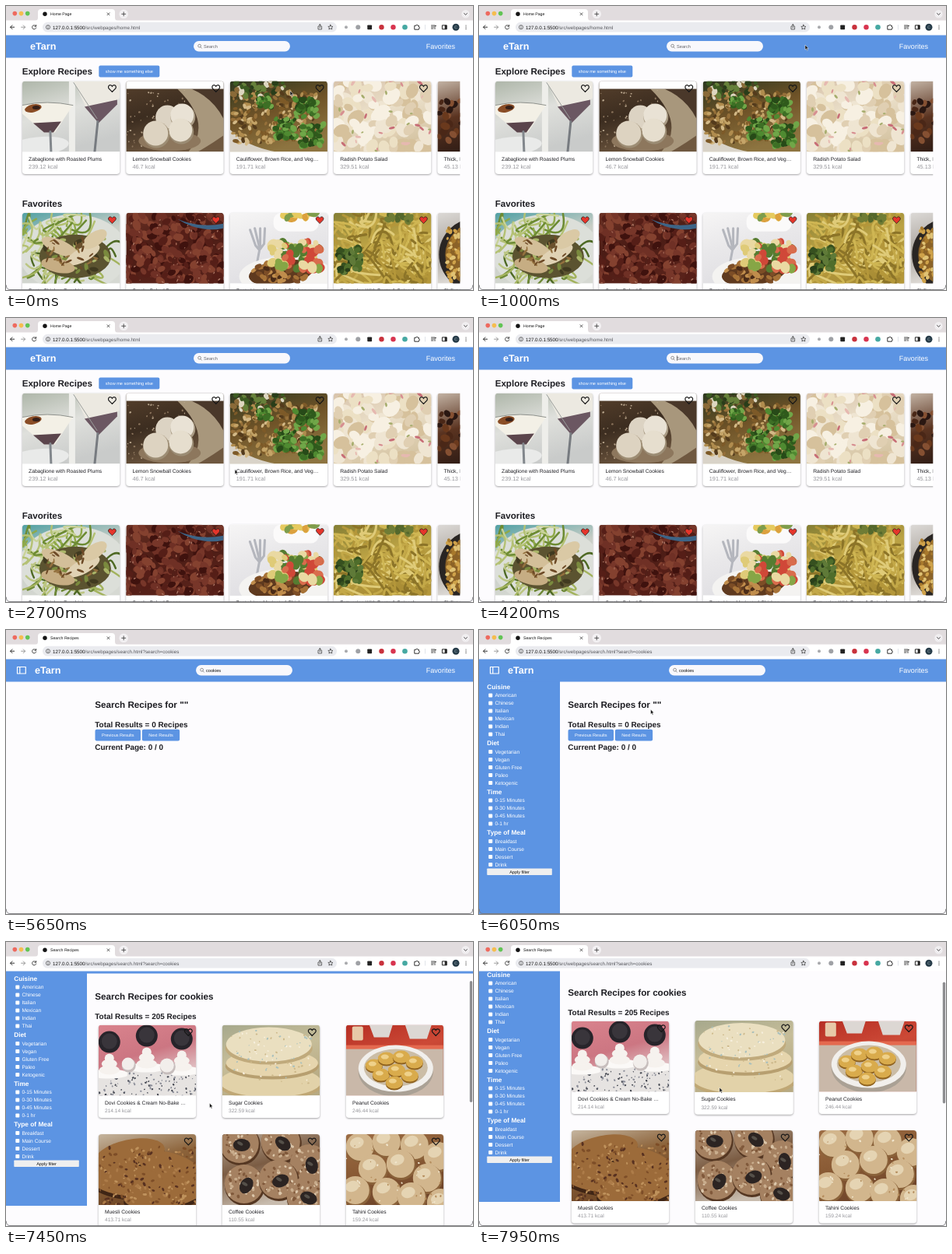
An HTML page for the animation above (8 s loop, 600 px wide and 365 px high).

```html
<!DOCTYPE html>
<html lang="en">
<head>
<meta charset="utf-8">
<title>Recipe browser</title>
<style>
html, body { margin: 0; width: 100%; height: 100%; overflow: hidden; background: #fff; }
svg { display: block; width: 600px; height: 365px; font-family: "Liberation Sans", Arial, sans-serif; text-rendering: geometricPrecision; }
text { white-space: pre; }
.shadow { filter: drop-shadow(0 1px 1px rgba(0, 0, 0, .35)); }
</style>
</head>
<body>
<svg id="stage" viewBox="0 0 600 365"></svg>
<script>
const LOOP = 8000, BLUE = '#5c94e3', INK = '#1d1d22', PAGE = '#fdfcfe';

// ---- drawing helpers ----
const text = (x, y, size, str, fill = INK, extra = '') =>
  `<text x="${x}" y="${y}" font-size="${size}" fill="${fill}" ${extra}>${str}</text>`;
const bold = (x, y, size, str, fill = INK) => text(x, y, size, str, fill, 'font-weight="700"');
const rect = (x, y, w, h, fill, r = 0) =>
  `<rect x="${x}" y="${y}" width="${w}" height="${h}" rx="${r}" fill="${fill}"/>`;
const oval = (x, y, rx, ry, fill, turn = 0) =>
  `<ellipse cx="${x}" cy="${y}" rx="${rx}" ry="${ry}" fill="${fill}" transform="rotate(${turn} ${x} ${y})"/>`;
const dot = (x, y, r, fill) => oval(x, y, r, r, fill);
const shape = (d, fill) => `<path d="${d}" fill="${fill}"/>`;
const line = (d, stroke, w = 1) =>
  `<path d="${d}" fill="none" stroke="${stroke}" stroke-width="${w}" stroke-linecap="round" stroke-linejoin="round"/>`;
const button = (x, y, w, h, label) => rect(x, y, w, h, BLUE, 2) +
  text(x + w / 2, y + h / 2 + 2, 5.57, label, '#fff', 'text-anchor="middle"');

let gradients = 0;
function wash(...colors) {
  const id = 'wash' + gradients++;
  const stops = colors.map((c, i) => `<stop offset="${i / (colors.length - 1)}" stop-color="${c}"/>`).join('');
  return `<linearGradient id="${id}" x2=".4" y2="1">${stops}</linearGradient>` + rect(0, 0, 126, 91, `url(#${id})`);
}
function random(seed) {
  return () => (seed = (seed * 16807 + 11) % 2147483647) / 2147483647;
}
function scatter(seed, n, [x, y, w, h], r, colors, flat = .75) {
  const rnd = random(seed * 7919);
  let out = '';
  for (let i = 0; i < n; i++) {
    const size = r * (.6 + .7 * rnd());
    out += oval((x + w * rnd()).toFixed(1), (y + h * rnd()).toFixed(1), size.toFixed(1),
      (size * flat).toFixed(1), colors[i % colors.length], Math.floor(rnd() * 180));
  }
  return out;
}
function noodles(seed, n, [x, y, w, h], width, colors) {
  const rnd = random(seed * 7919);
  let out = '';
  for (let i = 0; i < n; i++) {
    const px = Math.round(x + w * rnd()), py = Math.round(y + h * rnd());
    const bend = () => Math.round(rnd() * 60 - 30);
    out += line(`M${px} ${py}q${bend()} ${bend()} ${bend()} ${bend()}`, colors[i % colors.length], width);
  }
  return out;
}
const ball = (x, y, r, light, dark) => dot(x + 1, y + 2, r, dark) + dot(x, y, r - 1, light);

// ---- pictures, each 125 x 91 ----
const FULL = [0, 0, 125, 91];
const FLORETS = ['#2f5a1c', '#4f8a31', '#70a648', '#3d6f25', '#274a18'];
const photos = {
  zabaglione: () => wash('#aeb6a9', '#dfe0dc', '#c9cbca') + rect(60, 0, 8, 91, '#eeeeea') +
    shape('M66 0H125V22L100 40 82 34Z', '#ece9e1') + shape('M80 33L122 24V30L98 54Z', '#6b5762') +
    line('M97 52L93 91', '#777b80', 3) + oval(20, 84, 40, 12, '#e9eae9', -6) +
    shape('M0 31Q32 24 65 31L42 66 28 66 0 42Z', '#f3f0e6') + shape('M14 54L50 52 40 66 28 66Z', '#5b454c') +
    oval(14, 35, 11, 5, '#8a4d26', -12) + oval(18, 34, 5, 2.5, '#362019') + line('M0 31Q32 24 65 31', '#8e918c', 1) +
    line('M36 65L37 91', '#82878c', 3) + line('M66 2L96 48', '#9b9f9c', 1),
  lemon: () => wash('#56402c', '#3c2d20', '#6f5840') + shape('M66 10L125 10V70Q108 82 92 91H80Q112 55 66 10Z', '#a8977c') +
    shape('M84 10H125V48Q112 22 84 10Z', '#4a382a') + scatter(3, 70, [0, 12, 80, 79], 1.1, ['#b9a68d', '#8b745c']) +
    oval(56, 77, 40, 13, '#8d775d') + ball(53, 46, 16, '#dcd3c3', '#a3957e') + ball(72, 44, 16, '#e9e2d5', '#a99b84') +
    ball(70, 63, 16, '#e6dece', '#9b8c74') + ball(38, 67, 17, '#ddd3c1', '#9d8d74') + rect(0, 0, 126, 10, '#fff'),
  rice: () => wash('#2c3820', '#6e5227', '#8d7440') + shape('M0 62Q20 84 60 91H0Z', '#d9d3c8') +
    scatter(5, 230, [4, 14, 108, 66], 3.4, ['#b08c4e', '#7d5a28', '#d3b987', '#543b1c', '#96703a', '#c4a468'], .6) +
    scatter(8, 46, [0, 0, 70, 22], 4, ['#3c5a22', '#66803a', '#ddd6c0', '#293d19', '#8a6a38']) +
    scatter(12, 48, [84, 22, 28, 24], 4, FLORETS) + scatter(13, 48, [58, 48, 26, 26], 4, FLORETS) +
    scatter(14, 48, [92, 56, 28, 28], 4, FLORETS) + scatter(15, 24, [36, 22, 18, 14], 3.5, FLORETS),
  radish: () => wash('#d8c3ab', '#eadfc9', '#d6c5a4') +
    scatter(9, 110, FULL, 10, ['#efe5d2', '#e0cfb2', '#f7f0e2', '#d6c19c', '#ece0c4']) +
    scatter(4, 20, FULL, 4, ['#d78f91', '#e6b9b0', '#c76d76'], .4) + scatter(2, 10, FULL, 2.5, ['#a6ad6d'], .5),
  thick: () => wash('#c3b3a4', '#5a3320', '#2b1a14') +
    scatter(11, 90, [0, 22, 125, 69], 5, ['#4a2717', '#6a391d', '#2a1712', '#855032']),
  zucchini: () => wash('#50a0a4', '#c9cec6', '#d6d9d3') + oval(66, 52, 70, 50, '#dcdfd9') +
    noodles(7, 40, [0, 6, 70, 40], 2.5, ['#8fa94a', '#b4c174', '#6d8b33', '#c9d39a']) +
    noodles(8, 40, [20, 50, 90, 36], 2.5, ['#6f8a38', '#a3b35e', '#4f6a25', '#bcc683']) +
    oval(68, 56, 46, 28, '#5b5330') + scatter(16, 50, [26, 32, 84, 46], 5, ['#403a20', '#7a8a3e', '#6b512d', '#a9b468'], .5) +
    oval(48, 44, 25, 9, '#d3bf99', 24) + oval(78, 54, 24, 9, '#e0d2b4', -28) + oval(46, 68, 22, 9, '#c6ad83', 12) +
    oval(93, 34, 18, 9, '#dac9a5', -35) + scatter(17, 24, [32, 34, 66, 40], 4, ['#6d4a27', '#94713f'], .3),
  beans: () => wash('#6b3124', '#4b1c15', '#58221a') +
    scatter(17, 240, FULL, 6, ['#6f3025', '#551e17', '#84412f', '#3f120e', '#773629'], .7) +
    scatter(18, 60, FULL, 1.4, ['#b07b68', '#a06552'], .5) + shape('M66 8Q94 20 125 14V20Q94 26 66 8Z', '#3d6486'),
  salad: () => wash('#f6f5f5', '#e9e8ea', '#dfdee2') + rect(56, 0, 58, 24, '#fbfafa', 10) +
    scatter(23, 18, [62, 0, 48, 7], 6, ['#dca13e', '#e6ca5f', '#7e9d4c']) +
    line('M30 91L38 48M26 22L33 42 38 48 44 40 45 20M32 20L38 45M39 20L39 45', '#b4b6bd', 3) +
    oval(74, 82, 62, 26, '#f4f3f1') + oval(66, 77, 42, 16, '#5f3a1f', -8) +
    scatter(24, 44, [28, 66, 70, 22], 5, ['#7c4d26', '#a77338', '#4a2b17', '#c08d4c'], .6) +
    scatter(22, 70, [54, 38, 62, 34], 6, ['#d04838', '#86a646', '#ead9a2', '#d96c4c', '#567c31', '#dfcb78'], .8),
  pasta: () => wash('#857f35', '#bba244', '#a98d35') +
    noodles(29, 170, FULL, 3, ['#cfb653', '#b4973a', '#dfcb78', '#8c7428', '#c3a848']) +
    scatter(31, 50, [6, 46, 30, 30], 4.5, ['#36501f', '#4f6d2b', '#293e19', '#5f7a38']) +
    scatter(32, 20, [66, 0, 40, 12], 4, ['#6f7c35', '#54682c']),
  skillet: () => wash('#dcd9d6', '#aaa49d', '#ece9e5') + oval(52, 54, 50, 48, '#292523') + oval(54, 54, 44, 42, '#8b6227') +
    scatter(37, 180, [12, 18, 70, 72], 3, ['#cfa24a', '#a8792c', '#e0c274']),
  creamCups: () => wash('#d9838d', '#cc7682', '#e8dcdc') +
    [[14, 22], [62, 14], [107, 18]].map(([x, y]) =>
      rect(x - 25, y + 40, 49, 60, '#e6e3e1', 5) + scatter(x + 3, 44, [x - 24, y + 46, 46, 30], 1.2, ['#42454f', '#8b8d98']) +
      oval(x, y + 41, 25, 6, '#fbf9f7') + dot(x, y, 14, '#27242a') + dot(x, y - 1, 10, '#39353b') +
      [[13, 36], [10, 28], [6, 21]].map(([r, dy]) => oval(x, y + dy, r, 6, '#f6f2ee')).join('')).join('') +
    ball(88, 52, 10, '#f2eeeb', '#c7bebd') + ball(38, 50, 9, '#f2eeeb', '#c7bebd'),
  sugar: () => wash('#a6a88c', '#c6bd99', '#b7aa83') + oval(62, 77, 66, 20, '#bfa775') + oval(62, 73, 65, 20, '#e2d2a9') +
    oval(64, 53, 60, 17, '#b79f70') + oval(64, 49, 59, 17, '#e6d5ad') + oval(60, 30, 56, 21, '#c0aa7c') +
    oval(60, 25, 55, 22, '#eadfc0') + scatter(41, 90, [10, 6, 105, 70], 1.2, ['#f7f0de', '#cdb98b', '#a9c0bd']),
  peanut: () => wash('#b62f24', '#cc4936', '#a9382a') + rect(0, 30, 125, 61, '#c9b8a9') + rect(0, 26, 125, 5, '#e4694f') +
    shape('M30 0H60L55 16H36ZM76 0H110L104 18H82Z', '#dcd7d3') + rect(8, 2, 14, 18, '#e7c9a8', 2) +
    oval(64, 60, 48, 32, '#aaa195') + oval(64, 56, 48, 30, '#f1efec') + oval(64, 55, 41, 24, '#cbbda6') +
    [[36, 52], [52, 43], [71, 41], [88, 48], [45, 64], [65, 58], [82, 65], [62, 74]].map(([x, y]) =>
      oval(x, y + 2, 11, 8, '#8f621f') + oval(x, y, 11, 8, '#d9ab4c') + oval(x - 2, y - 2, 5, 3, '#efd18a')).join(''),
  muesli: () => wash('#c5b59f', '#8c633a', '#6c4424') +
    [[40, 27, 46, 20, -12], [92, 42, 42, 18, 16], [34, 58, 50, 21, 8], [84, 76, 52, 19, -8]].map(([x, y, rx, ry, a]) =>
      oval(x, y + 5, rx, ry, '#3f2515', a) + oval(x, y, rx, ry, '#9c6b3a', a)).join('') +
    scatter(43, 190, [0, 16, 125, 75], 2.2, ['#bf925c', '#7d4d27', '#ad7c49', '#583120'], .6),
  coffee: () => wash('#b9a896', '#7b5c43', '#c8bcae') +
    [[22, 12], [75, 10], [112, 38], [28, 64], [72, 58], [108, 80]].map(([x, y], i) =>
      ball(x, y, 26, '#a58161', '#553722') + scatter(50 + i, 36, [x - 19, y - 19, 38, 38], 2, ['#c9ad8d', '#80593b', '#dbc6aa']) +
      oval(x + 3, y + 2, 11, 8, '#2c2422', i * 40) + oval(x + 1, y, 4, 2, '#555049', 30)).join(''),
  tahini: () => wash('#9d6d45', '#8a5b35', '#6f452a') +
    [[18, 16], [52, 10], [88, 14], [118, 28], [34, 44], [70, 38], [104, 56], [12, 72], [52, 74], [84, 80], [122, 88]].map(([x, y]) =>
      ball(x, y, 19, '#d2b68d', '#8a623a') + oval(x - 4, y - 5, 9, 7, '#e5d4b3', -20)).join('') +
    scatter(61, 40, FULL, 1.3, ['#f1e6cd', '#b58d5d'])
};

// ---- cards ----
const HEART = 'M0 4.4L-4.2.1C-6.6-3.2-2.2-6.3 0-2.7C2.2-6.3 6.6-3.2 4.2.1Z';
const cards = [];
function card(view, x, y, photo, title, kcal, liked = false) {
  cards.push({ view, x, y });
  return `<g class="card"><g class="shadow">${rect(0, 0, 125.3, 119.5, '#fff', 4)}</g>` +
    `<g clip-path="url(#photoClip)">${photos[photo]()}</g>` +
    `<path d="${HEART}" transform="translate(115.5 9.5)" fill="${liked ? '#e5352b' : 'none'}" stroke="#161616" stroke-width="${liked ? .7 : 1.2}"/>` +
    text(8.2, 102.4, 6.7, title) + text(8.2, 112.4, view === 'home' ? 7.3 : 6.6, kcal + ' kcal', '#96969b') + '</g>';
}
const homeCards = (y, liked, list) => list.map(([photo, title, kcal], i) =>
  card('home', 20.9 + i * 133.35, y, photo, title, kcal, liked)).join('');

const home = `<g id="home">` +
  bold(20.7, 88, 11.6, 'Explore Recipes') + button(119.3, 76.6, 78, 14.8, 'show me something else') +
  bold(20.7, 257.5, 11.6, 'Favorites') + '<g clip-path="url(#rowClip)">' +
  homeCards(96.5, false, [
    ['zabaglione', 'Zabaglione with Roasted Plums', '239.12'],
    ['lemon', 'Lemon Snowball Cookies', '46.7'],
    ['rice', 'Cauliflower, Brown Rice, and Veg…', '191.71'],
    ['radish', 'Radish Potato Salad', '329.51'],
    ['thick', 'Thick, Irish Stew', '45.13']]) +
  homeCards(265.7, true, [
    ['zucchini', 'Pesto Chicken Zucchini', '310.2'],
    ['beans', 'Smoky Baked Beans', '280.4'],
    ['salad', 'Zesty Lime Marinated Chicken w…', '402.1'],
    ['pasta', 'Fettuccine With Pesto &amp; Spinach', '350.6'],
    ['skillet', 'Skillet Corn', '190.3']]) + '</g></g>';

// ---- search page ----
const filters = [
  [73, 84, 'Cuisine', 'American,Chinese,Italian,Mexican,Indian,Thai'],
  [145, 156.4, 'Diet', 'Vegetarian,Vegan,Gluten Free,Paleo,Ketogenic'],
  [208, 219, 'Time', '0-15 Minutes,0-30 Minutes,0-45 Minutes,0-1 hr'],
  [260, 271.4, 'Type of Meal', 'Breakfast,Main Course,Dessert,Drink']];
const sidebar = `<g id="sidebar">` + rect(0, 66, 104, 299, BLUE) + filters.map(([y, first, head, items]) =>
  bold(10.2, y + 2.9, 8.3, head, '#fff') + items.split(',').map((item, i) =>
    rect(12.3, first + i * 10 - 2.5, 5, 5, '#fff', .9) + text(20.4, first + i * 10 + 2.3, 6.65, item, '#fff')).join('')).join('') +
  rect(10.3, 306.5, 83.5, 8.5, '#efefef', .8) + text(52, 312.8, 5.5, 'Apply filter', '#111', 'text-anchor="middle"') + '</g>';

const results = [
  ['creamCups', 'Dovi Cookies &amp; Cream No-Bake …', '214.14'],
  ['sugar', 'Sugar Cookies', '322.59'],
  ['peanut', 'Peanut Cookies', '246.44'],
  ['muesli', 'Muesli Cookies', '413.71'],
  ['coffee', 'Coffee Cookies', '110.55'],
  ['tahini', 'Tahini Cookies', '159.24']
].map(([photo, title, kcal], i) =>
  card('search', 118.8 + i % 3 * 159, 132.6 + Math.floor(i / 3) * 140.4, photo, title, kcal)).join('');

const search = `<g id="search">` +
  '<g id="empty">' + bold(114.3, 100.2, 11.67, 'Search Recipes for ""') + bold(114.3, 124.5, 9.93, 'Total Results = 0 Recipes') +
  button(114.5, 127.8, 58.5, 14.8, 'Previous Results') + button(174.8, 127.8, 48.3, 14.8, 'Next Results') +
  bold(114.3, 154, 9.93, 'Current Page: 0 / 0') + '</g>' +
  '<g id="found">' + bold(114.3, 100.2, 11.67, 'Search Recipes for cookies') +
  bold(114.3, 124.5, 9.93, 'Total Results = 205 Recipes') + results + '</g>' + sidebar + '</g>';

const header = '<g id="header">' + rect(0, 37, 600, 29.5, BLUE) +
  '<g id="menu">' + line('M14.5 47.5H25.3V56H14.5ZM17.8 47.5V56', '#fff', 1.2) + '</g>' +
  `<g id="brand">${bold(31, 56, 12.6, 'eTarn', '#fff')}</g>` + text(539.7, 54.7, 9.1, 'Favorites', '#fff') +
  '<g id="box">' + rect(241, 45, 124, 13.4, '#f8f8fc', 6.7) +
  '<circle cx="248.6" cy="51.2" r="1.9" fill="none" stroke="#555" stroke-width=".6"/>' + line('M250 52.7L251.4 54.2', '#555', .6) +
  '<text id="query" x="254" y="53.6" font-size="5.65"></text>' + '<rect id="caret" y="48.4" width=".6" height="6.4" fill="#222"/>' + '</g></g>';

// ---- browser frame ----
const chrome = rect(0, 0, 600, 22, '#e1dcde') + rect(0, 18.5, 600, 19, '#fff') +
  dot(11.3, 9.6, 2.8, '#ee6a5f') + dot(19.5, 9.6, 2.8, '#f5bd4f') + dot(27.7, 9.6, 2.8, '#61c454') +
  shape('M37 19Q41 19 41 15V8Q41 4 45 4H136Q140 4 140 8V15Q140 19 144 19Z', '#fff') + dot(50, 10.3, 2.7, '#151515') +
  '<text id="tab" x="57" y="12.2" font-size="5.2" fill="#111"></text>' +
  line('M130 8.8L133 11.8M133 8.8L130 11.8', '#333', .8) + dot(151.2, 10.3, 5.8, '#f3f1f3') +
  line('M148.7 10.3H153.7M151.2 7.8V12.8', '#333', .8) + dot(590.5, 10.3, 5.2, '#f0eef0') + line('M588.6 9.5L590.5 11.3 592.4 9.5', '#333', .9) +
  line('M10.6 27.2H5.6M8 24.8L5.6 27.2 8 29.6', '#333', 1) + line('M19.6 27.2H24.6M22.2 24.8L24.6 27.2 22.2 29.6', '#999', 1) +
  line('M38.2 25.6A2.6 2.6 0 1 0 38.7 28M38.7 24.4V26.2H36.9', '#333', .9) +
  rect(47, 20.8, 378, 12.8, '#eaebef', 6.4) + '<circle cx="54" cy="27.2" r="2.6" fill="none" stroke="#444" stroke-width=".7"/>' +
  line('M54 27V28.5M54 25.7V25.8', '#444', .7) +
  text(60, 29.5, 6.22, '127.0.0.1:5500<tspan id="path" fill="#55565b"></tspan>', '#111') +
  line('M402 26H401V30H405.6V26H404.6M403.3 28V23.6M402 24.8L403.3 23.5 404.6 24.8', '#444', .8) +
  line('M416.9 24.2L417.8 26.2 420 26.4 418.4 27.9 418.9 30 416.9 28.9 414.9 30 415.4 27.9 413.8 26.4 416 26.2Z', '#444', .8) +
  dot(437, 27.2, 2, '#a9aaad') + dot(452.3, 27.2, 3, '#9fa1a5') + rect(464.3, 24.4, 5.8, 5.8, '#222', .8) +
  dot(482.5, 27.2, 3.2, '#c8313c') + dot(497.5, 27.2, 3.2, '#d8344f') + dot(512.5, 27.2, 3.3, '#46a8a2') +
  line('M525.2 25.2H527A1 1 0 0 1 529 25.2H530.4V27A1 1 0 0 1 530.4 29V30.2H525.2Z', '#333', 1) + rect(538.3, 24, .6, 6.5, '#cfd3dc') +
  line('M546.5 25H551M546.5 27H549.5M546.5 29H549M551 29.5V25.5H552.5', '#333', .9) +
  line('M560.8 24.8H566.2V29.8H560.8Z', '#222', 1) + rect(563.7, 24.8, 2.5, 5, '#222') + dot(578, 27.2, 4.5, '#263b48') +
  text(578, 29, 5, 'C', '#b9cbd2', 'text-anchor="middle"') + [25, 27.2, 29.4].map(y => dot(591, y, .6, '#333')).join('');

document.getElementById('stage').innerHTML =
  '<defs><clipPath id="photoClip"><path d="M0 91V4Q0 0 4 0H121.3Q125.3 0 125.3 4V91Z"/></clipPath>' +
  '<clipPath id="rowClip"><rect x="19" y="66" width="564.3" height="300"/></clipPath></defs>' +
  rect(0, 0, 600, 365, PAGE) + home + '<g id="scrolled">' + search + header + '</g>' +
  '<rect id="scrollbar" x="595.8" width="3.4" height="156" rx="1.7" fill="#8d8d90"/>' + chrome +
  line('M.3 359Q.3 364.5 5 364.5H595Q599.7 364.5 599.7 359', '#77777b', .9) +
  '<path id="cursor" d="M0 0V6.2L1.4 4.9 2.4 7.2 3.4 6.8 2.4 4.6H4.3Z" fill="#111" stroke="#fff" stroke-width=".5"/>';

// ---- motion ----
const $ = id => document.getElementById(id);
const show = (id, on) => $(id).setAttribute('display', on ? 'inline' : 'none');
const move = (id, x, y) => $(id).setAttribute('transform', `translate(${x} ${y})`);
const nodes = document.querySelectorAll('.card');
const ramp = (t, a, b) => {
  const p = Math.min(1, Math.max(0, (t - a) / (b - a)));
  return p * p * (3 - 2 * p);
};
const latest = (steps, t) => steps.reduce((value, [at, v]) => t >= at ? v : value, steps[0][1]);

// The pointer visits the recipes, then the favorites, the search box, the menu and the results.
const pointer = [
  [100, 365, 109], [700, 419, 50], [1200, 419, 50], [1350, 455, 130], [1500, 230, 125], [1650, 208, 78],
  [2000, 130, 84], [2100, 130, 84], [2350, 150, 262], [2550, 300, 290], [2900, 285, 50], [3250, 285, 50], [3500, 290, 78],
  [5700, 290, 78], [5800, 20, 51], [5880, 20, 51], [6050, 220.5, 102], [6300, 261.5, 207], [7700, 261.5, 207], [7950, 309, 187]];
const typed = [[0, ''], [4250, 'c'], [4500, 'co'], [4650, 'coo'], [4750, 'cook'], [5150, 'cooki'], [5200, 'cookie'], [5250, 'cookies']];

function pointerAt(t) {
  const i = pointer.findIndex(p => p[0] > t);
  if (i === 0) return pointer[0].slice(1);
  if (i < 0) return pointer[pointer.length - 1].slice(1);
  const [t0, x0, y0] = pointer[i - 1], [t1, x1, y1] = pointer[i], p = ramp(t, t0, t1);
  return [x0 + (x1 - x0) * p, y0 + (y1 - y0) * p];
}
const scrollAt = t => t < 7450 ? 0 : 26 + 5 * ramp(t, 7700, 7900);

// A card grows under the pointer, smoothed over the last 200 ms; resting at the start does not count.
const HOVER_FROM = 1000;
function hover({ x, y }, t) {
  let sum = 0;
  for (let past = t; past > t - 200 && past > HOVER_FROM; past -= 25) {
    const [px, py] = pointerAt(past), dx = px - x, dy = py + scrollAt(past) - y;
    if (dx > 0 && dx < 125 && dy > 0 && dy < 119) sum++;
  }
  return 1 + .012 * sum / 8;
}

function update(t) {
  const searching = t >= 5500, found = t >= 6500, scroll = scrollAt(t), query = latest(typed, t);
  show('home', !searching);
  show('search', searching);
  show('menu', searching);
  show('empty', !found);
  show('found', found);
  move('brand', searching ? 6 : 0, 0);
  move('box', searching ? 3 : 0, 0);
  move('scrolled', 0, -scroll);
  move('sidebar', -104 * (1 - ramp(t, 5820, 6000)), 0);
  show('scrollbar', t >= 7450);
  $('scrollbar').setAttribute('y', 50 + (scroll - 26) * .3);

  $('tab').textContent = searching ? 'Search Recipes' : 'Home Page';
  $('path').textContent = searching ? '/src/webpages/search.html?search=cookies' : '/src/webpages/home.html';
  $('query').textContent = query || 'Search';
  $('query').setAttribute('fill', query ? '#111' : '#66666b');
  show('caret', !searching && t >= 3500 && !(t >= 3900 && t < 4200));
  $('caret').setAttribute('x', 254 + (query ? $('query').getComputedTextLength() : 0));

  cards.forEach((c, i) => {
    const s = (c.view === 'search') === searching ? hover(c, t) : 1;
    nodes[i].setAttribute('transform', `translate(${c.x + 62.6 * (1 - s)} ${c.y + 59.7 * (1 - s)}) scale(${s})`);
  });
  move('cursor', ...pointerAt(t));
  show('cursor', t < 4200 || t >= 5700);
}

const start = performance.now();
function tick() {
  update((performance.now() - start) % LOOP);
  requestAnimationFrame(tick);
}
tick();
</script>
</body>
</html>
```
